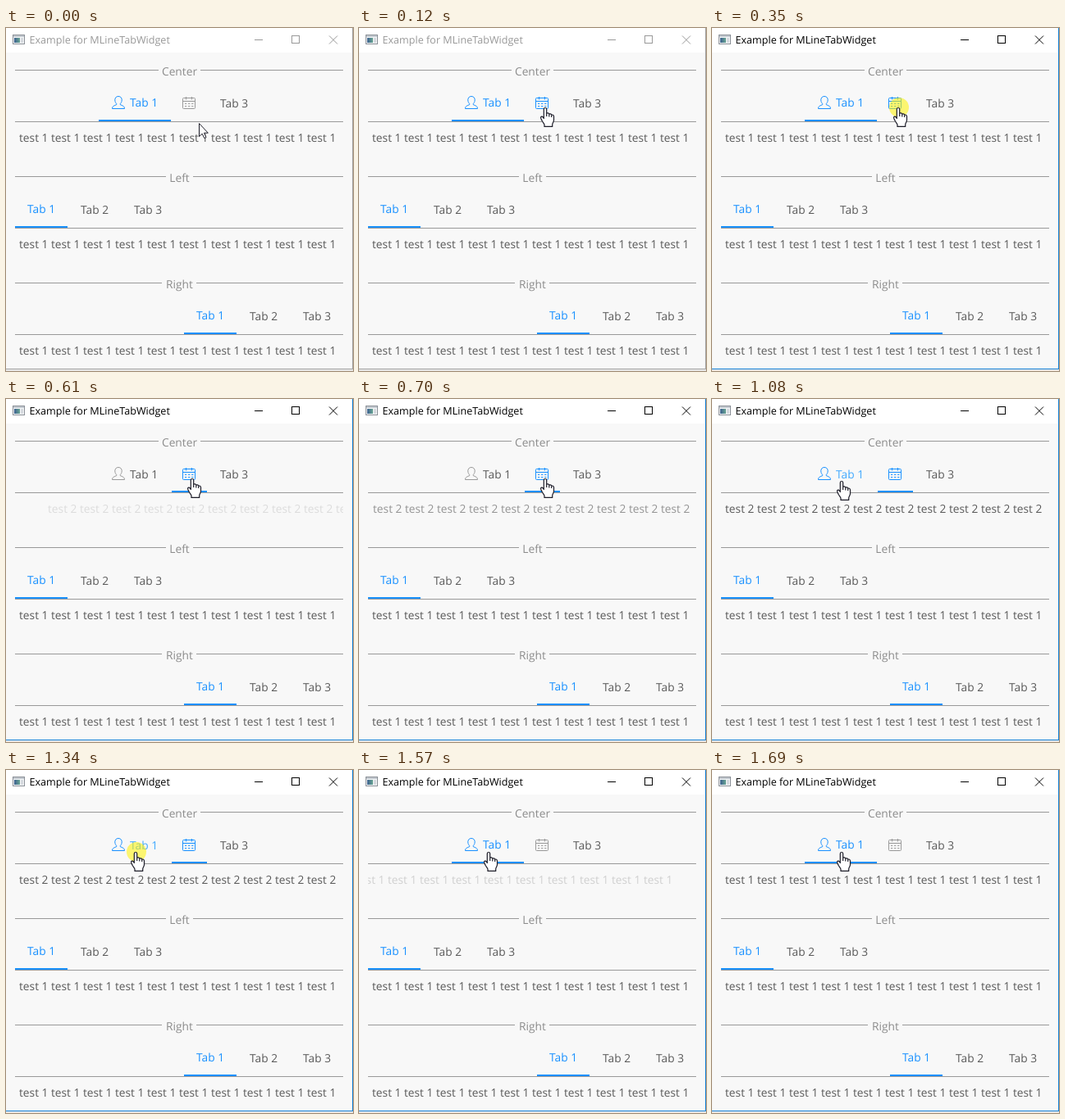
Animation of 423 by 419 pixels, one loop 1.86 s. Source, as an HTML page:

```html
<!DOCTYPE html>
<html lang="en">
<head>
<meta charset="utf-8">
<title>Line tabs</title>
<style>
  html, body { margin: 0; width: 100%; height: 100%; overflow: hidden; background: #f8f8f8; }
  svg { display: block; width: 423px; height: 419px; }
  text { font: 13.75px "Open Sans", "Noto Sans", sans-serif; fill: #595959; white-space: pre; text-rendering: geometricPrecision; }
  .heading { fill: #8c8c8c; text-anchor: middle; }
  .title { font-size: 12.6px; }
  .sharp { shape-rendering: crispEdges; }
  .icon { fill: none; stroke-width: 1; }
</style>
</head>
<body>
<svg id="stage" viewBox="0 0 423 419" xmlns="http://www.w3.org/2000/svg">
  <defs>
    <clipPath id="pageClip"><rect x="11" y="115" width="400" height="40"/></clipPath>
    <linearGradient id="appFill"><stop stop-color="#3c5f8f"/><stop offset="1" stop-color="#6aa793"/></linearGradient>
  </defs>
  <rect width="423" height="419" fill="#f8f8f8"/>
  <rect width="423" height="30" fill="#fff"/>
  <g class="sharp">
    <rect x="8" y="8" width="15" height="12" fill="#8b9097"/>
    <rect x="9" y="9" width="13" height="10" fill="#f4f6f8"/>
    <rect x="9" y="9" width="13" height="2" fill="#c3c9d0"/>
    <rect x="10" y="12" width="7" height="6" fill="url(#appFill)"/>
    <rect x="18" y="12" width="3" height="6" fill="#d5d9de"/>
  </g>
  <text id="title" class="title" x="28.5" y="19">Example for MLineTabWidget</text>
  <g id="buttons" fill="none">
    <path class="sharp" d="M303 14.5H313M348.5 9.5H357.5V18.5H348.5Z"/>
    <path d="M394 9.5L404 19.5M404 9.5L394 19.5"/>
  </g>
  <g id="sections"></g>
  <g id="person" class="icon">
    <path d="M137 83.5c-2.8 0-4.2 2-4.2 4.4 0 2 .8 3.5 1.9 4.6v1.2c-2.6.9-5.2 1.7-5.2 4.8h15c0-3.1-2.6-3.9-5.2-4.8v-1.2c1.1-1.1 1.9-2.6 1.9-4.6 0-2.4-1.4-4.4-4.2-4.4z"/>
  </g>
  <g id="calendar" class="icon">
    <rect x="215.5" y="85.5" width="15" height="13" rx="1"/>
    <path d="M215.5 89.5H230.5M219.5 84V87.5M226.5 84V87.5"/>
    <path d="M218 92.5H228.5M218 95.5H228.5" stroke-dasharray="2.2 1.9"/>
  </g>
  <g clip-path="url(#pageClip)"><text id="page" y="139"></text></g>
  <g id="frame" class="sharp">
    <rect x="422" width="1" height="417"/>
    <rect y="416" width="423" height="1"/>
  </g>
  <rect class="sharp" y="417" width="423" height="2" fill="#e6e6e6"/>
  <circle id="press" r="12" fill="#fff200" fill-opacity=".55"/>
  <g id="cursor" fill="#fff" stroke="#1c1c28" stroke-linejoin="round">
    <path id="arrow" d="M.5.6V16.6L4.2 13.2 6.8 18.6 9 17.6 6.5 12.2H11.3Z"/>
    <path id="hand" stroke-width="1.2" d="M-1.7 13.5V2.2a1.7 1.7 0 0 1 3.4 0V7.4c.7-1 2.9-.8 3.1.9.8-.8 2.7-.5 2.9 1 1-.7 2.8-.1 2.8 1.6V15.5c0 2.3-1.8 3.6-1.8 5.6V23.4H-1V21.3c0-1.6-2-3-2.9-5-.6-1.5-1.6-2.6-1.5-3.9.1-1.5 1.8-1.6 2.6-.6ZM1.7 7.5V11M4.8 8.5V11.5M7.7 9.5V12"/>
  </g>
</svg>
<script>
const LOOP = 1860, STEP = 30;
const BLUE = "#1890ff", HOVER = "#40a9ff", DARK = "#595959", GRAY = "#999";
const SVG = "http://www.w3.org/2000/svg";
const $ = id => document.getElementById(id);

function set(el, attrs) {
  for (const key in attrs) el.setAttribute(key, attrs[key]);
  return el;
}
function add(tag, attrs, content = "") {
  const el = set(document.createElementNS(SVG, tag), attrs);
  el.textContent = content;
  return $("sections").appendChild(el);
}
const bar = (x, end, y, h, fill) =>
  add("rect", { class: "sharp", x, y, width: end - x, height: h, fill });
const label = (x, y, content) => add("text", { x, y }, content);
const sentence = n => Array(10).fill("test " + n).join(" ");

function section(name, y, gapStart, gapEnd) {
  bar(11, gapStart, y + 51, 1, GRAY);
  bar(gapEnd, 411, y + 51, 1, GRAY);
  add("text", { class: "heading", x: 211.5, y: y + 58 }, name);
  bar(11, 411, y + 114, 1, GRAY);
}
function plainTabs(x, y) {
  label(x + 15, y + 96, "Tab 1").style.fill = BLUE;
  label(x + 80, y + 97, "Tab 2");
  label(x + 145, y + 97, "Tab 3");
  bar(x, x + 64, y + 112, 2, BLUE);
  label(16, y + 139, sentence(1));
}

section("Center", 0, 186, 237);
section("Left", 130, 195, 228);
section("Right", 260, 190, 232);
plainTabs(11, 130);
plainTabs(217, 260);
const firstTab = label(151, 97, "Tab 1");
label(261, 97, "Tab 3");
const underline = bar(113, 201, 112, 2, BLUE);

const clamp = v => Math.min(1, Math.max(0, v));
const easeOut = p => 1 - (1 - p) ** 2;
const smooth = p => p * p * (3 - 2 * p);
const stepped = (t, start, count) => clamp((Math.floor((t - start) / STEP) + 1) / count);

function pointer(t) {
  const a = easeOut(stepped(t, 30, 4)), b = smooth(stepped(t, 990, 4));
  return [Math.round(235 - 8 * a - 69 * b), Math.round(116 - 19 * a + 3 * b)];
}

// New pages slide in with a cubic ease-out while fading in with a cubic ease-in.
function slide(t, firstShown, begin) {
  if (t < firstShown) return 0;
  const shown = firstShown + Math.floor((t - firstShown) / STEP) * STEP;
  return clamp((shown - begin) / 300);
}

function draw(t) {
  const active = t >= 350;
  const second = t >= 480 && t < 1410;
  const [x, y] = pointer(t);
  const overTabs = y < 114;
  const overFirst = overTabs && x < 202;
  const overCalendar = overTabs && !overFirst;

  $("title").style.fill = active ? "#000" : GRAY;
  set($("buttons"), { stroke: active ? "#000" : GRAY });
  set($("frame"), { fill: active ? "#1883d7" : "#a6a6a6" });

  firstTab.style.fill = !second ? BLUE : overFirst ? HOVER : DARK;
  set(firstTab, { y: second ? 97 : 96 });
  set($("person"), { stroke: !second || overFirst ? BLUE : GRAY });
  set($("calendar"), { stroke: second || overCalendar ? BLUE : GRAY });
  set(underline, second ? { x: 202, width: 43 } : { x: 113, width: 88 });

  const progress = t < 480 ? 1 : second ? slide(t, 610, 443) : slide(t, 1570, 1381);
  const offset = Math.round(400 * (1 - progress) ** 3) * (second ? 1 : -1);
  $("page").textContent = sentence(second ? 2 : 1);
  set($("page"), { x: 16 + offset, opacity: progress ** 3 });

  const pressed = (t >= 350 && t < 480) || (t >= 1340 && t < 1410);
  set($("press"), { cx: x + 1, cy: y, visibility: pressed ? "visible" : "hidden" });
  set($("cursor"), { transform: `translate(${x} ${y})` });
  set($("hand"), { visibility: overTabs ? "visible" : "hidden" });
  set($("arrow"), { visibility: overTabs ? "hidden" : "visible" });
}

const began = performance.now();
function tick() {
  draw((performance.now() - began) % LOOP);
  requestAnimationFrame(tick);
}
tick();
</script>
</body>
</html>
```
